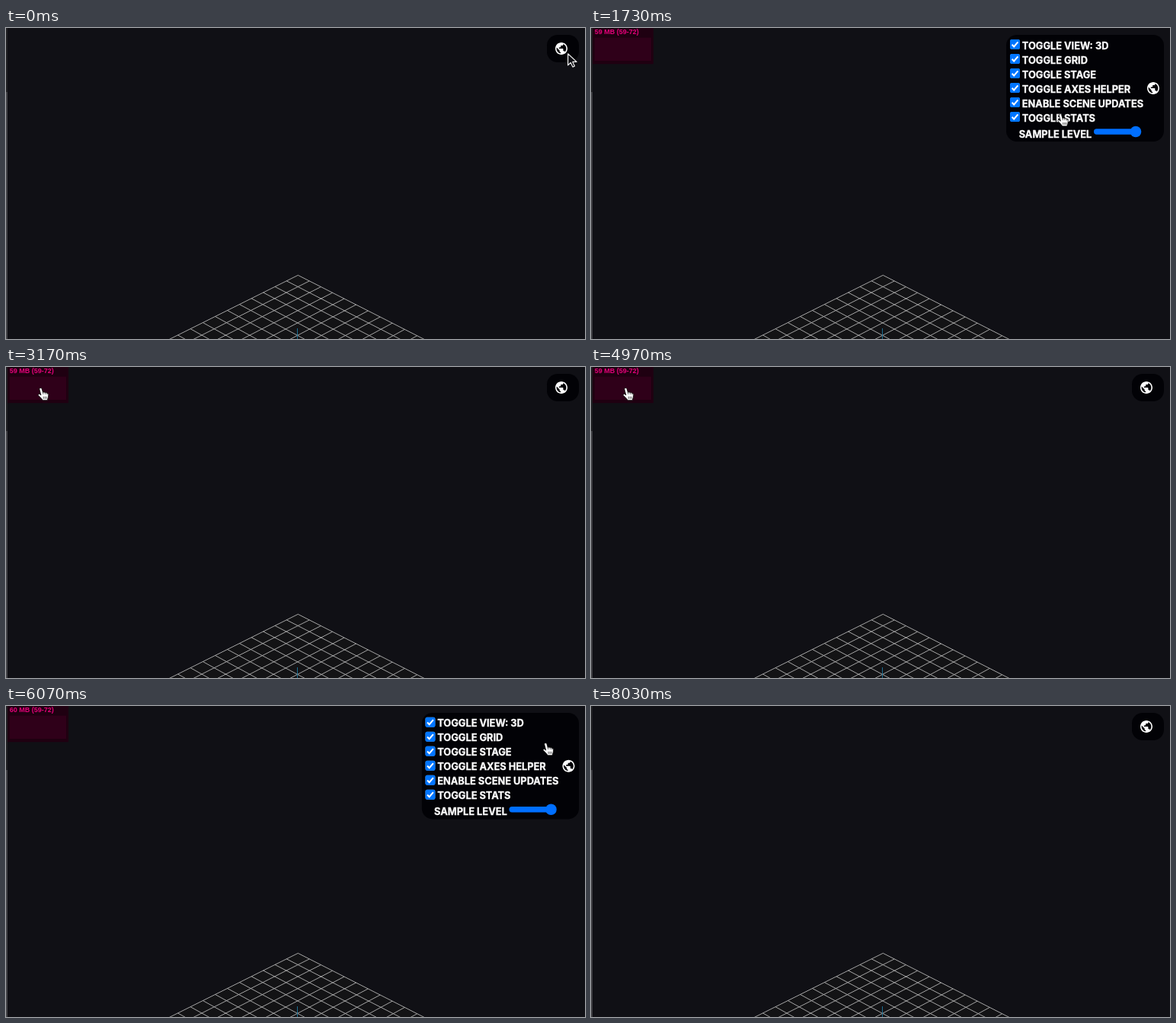
Animation of 760 by 408 pixels, one loop 8160 ms. Source, as an HTML page:

```html
<!DOCTYPE html>
<html lang="en">
<head>
<meta charset="utf-8">
<title>Scene settings panel</title>
<style>
html, body { margin: 0; width: 100%; height: 100%; overflow: hidden; background: #101015; }
svg { display: block; width: 760px; height: 408px; }
.label { font: 700 12.8px Inter, sans-serif; fill: #fff; stroke: #fff; stroke-width: .3; }
.memory { font: 700 9px "Liberation Sans", Arial, sans-serif; fill: #e6007a; }
</style>
</head>
<body>
<svg viewBox="0 0 760 408">
  <defs>
    <clipPath id="clip"><rect class="box" rx="14"/></clipPath>
    <path id="globe" fill="#fff" transform="scale(.8) translate(-12 -12)" d="M12 2C6.48 2 2 6.48 2 12s4.48 10 10 10 10-4.48 10-10S17.52 2 12 2zm-1 17.93c-3.95-.49-7-3.85-7-7.93 0-.62.08-1.21.21-1.79L9 15v1c0 1.1.9 2 2 2v1.93zm6.9-2.54c-.26-.81-1-1.39-1.9-1.39h-1v-3c0-.55-.45-1-1-1H8v-2h2c.55 0 1-.45 1-1V7h2c1.1 0 2-.9 2-2v-.41c2.93 1.19 5 4.06 5 7.41 0 2.08-.8 3.97-2.1 5.39z"/>
  </defs>
  <rect width="760" height="408" fill="#101015"/>
  <rect width="1" height="84" x=".5" fill="#303035"/>
  <rect width="1" height="324" x=".5" y="84" fill="#77777b"/>
  <path d="M383.3 324L215 408H549Z" fill="#131315"/>
  <path id="grid" fill="none" stroke="#b4b4b4" stroke-width=".9"/>
  <path d="M382.5 394V408" stroke="#1c6f92"/>

  <g id="stats">
    <rect x="2" y="-1" width="80" height="48.3" fill="#1f0011"/>
    <rect x="4.7" y="12.7" width="74.3" height="30.3" fill="#2f0019"/>
    <text id="memory" class="memory" x="4.7" y="8.4"></text>
  </g>

  <rect class="box" rx="14" fill="#020206"/>
  <g clip-path="url(#clip)">
    <g id="content">
      <g id="rows"></g>
      <text class="label" x="561.7" y="143.6">SAMPLE LEVEL</text>
      <rect x="660" y="132.3" width="60" height="7.4" rx="3.7" fill="#006fff"/>
      <circle cx="715" cy="136" r="7.3" fill="#006fff"/>
      <use href="#globe" x="738" y="79"/>
    </g>
    <g id="closedIcon"><use href="#globe"/></g>
  </g>

  <g id="cursor">
    <path id="arrow" fill="#101015" stroke="#f0f0f0" stroke-width="1.2" stroke-linejoin="round" d="M.6 .8v15l3.6-3.3 2.7 5.6 2.5-1.2-2.6-5.5h5.2z"/>
    <g id="hand" transform="scale(1.06)">
      <path fill="#fff" stroke="#000" stroke-width=".7" stroke-linejoin="round" d="M1.7 1.8C1.7 0 4.2-.1 4.8 1.6L6.1 6.2C7 5.2 8.3 5.5 8.7 6.4 9.6 5.7 10.8 6.2 11.1 7.1 12.4 6.7 13.2 7.8 13 9.2L12.6 12.2 11.5 15.7H6L3.4 12.4.4 9.6C-.2 8.4 1 7.4 2.2 8.2L3.7 9.4Z"/>
      <path fill="none" stroke="#000" stroke-width=".6" d="M6.1 6.2l.5 2.2M8.7 6.4l.4 2M11.1 7.1l.3 1.8M6.8 11v3M8.7 11v3M10.5 11v3"/>
    </g>
  </g>
</svg>
<script>
const LOOP = 8160;
const PANEL_MS = 300;
const panelOpen = [[30, 1870], [5800, 7290]];
const statsOn = [1330, 6970];
const memorySteps = [[0, 59], [1970, 60], [2970, 59], [3970, 60], [4970, 59], [5870, 60], [6900, 59]];
// time, x, y, shape shown from this time on
const cursorPath = [
  [0, 737, 33, 'arrow'], [30, 737, 33, 'arrow'], [300, 708, 52, 'hand'], [630, 647, 86, 'hand'],
  [830, 640, 92, 'hand'], [870, 640, 92, 'hand'], [1030, 613, 112, 'hand'], [1730, 613, 112, 'hand'],
  [1870, 543, 136, 'arrow'], [1970, 460, 142, 'arrow'], [2150, 275, 98, 'arrow'], [2330, 120, 45, 'arrow'],
  [2430, 70, 33, 'hand'], [2530, 44, 30, 'hand'], [2800, 42, 27, 'hand'], [4970, 42, 27, 'hand'],
  [5330, 52, 29, 'hand'], [5500, 52, 29, 'hand'], [5560, 100, 29, 'arrow'], [5680, 410, 30, 'arrow'],
  [5800, 708, 31, 'arrow'], [5900, 718, 32, 'arrow'], [6050, 708, 46, 'hand'], [6300, 670, 71, 'hand'],
  [6430, 573, 113, 'hand'], [6570, 573, 113, 'hand'], [6670, 573, 116, 'hand'], [7230, 573, 116, 'hand'],
  [7290, 660, 60, 'none'], [LOOP, 660, 60, 'none']
];

const byId = id => document.getElementById(id);
const boxes = document.querySelectorAll('.box');
const mix = (a, b, k) => a + (b - a) * k;
const show = (node, on) => node.setAttribute('display', on ? 'inline' : 'none');
const move = (node, x, y) => node.setAttribute('transform', `translate(${x} ${y})`);

// cubic-bezier(.25, .1, .25, 1)
function ease(x) {
  if (x <= 0) return 0;
  if (x >= 1) return 1;
  const curve = (a, b, s) => 3 * a * s * (1 - s) ** 2 + 3 * b * s * s * (1 - s) + s ** 3;
  let low = 0, high = 1;
  for (let n = 0; n < 20; n++) {
    const mid = (low + high) / 2;
    if (curve(.25, .25, mid) < x) low = mid; else high = mid;
  }
  return curve(.1, 1, low);
}

function buildGrid() {
  const point = (i, j) => {
    const depth = 1 - .0049 * (i + j);
    return `${383.3 + (14.87 * j - 15 * i) / depth} ${324.3 + (7.47 * i + 7.55 * j) / depth}`;
  };
  let d = '';
  for (let n = 0; n < 13; n++) {
    d += `M${point(n, 0)}L${point(n, 13)}M${point(0, n)}L${point(13, n)}`;
  }
  byId('grid').setAttribute('d', d);
}

function buildRows() {
  const labels = ['TOGGLE VIEW: 3D', 'TOGGLE GRID', 'TOGGLE STAGE', 'TOGGLE AXES HELPER',
    'ENABLE SCENE UPDATES', 'TOGGLE STATS'];
  byId('rows').innerHTML = labels.map((label, n) => {
    const y = 15 + 19 * n;
    return `<g><rect x="550.5" y="${y + .5}" width="12" height="12" rx="2" fill="#fff" stroke="#767676"/>
      <g class="tick"><rect x="550" y="${y}" width="13" height="13" rx="2" fill="#0075ff"/>
      <path d="M552.6 ${y + 6.8}l2.6 2.7 5.2-6.2" fill="none" stroke="#fff" stroke-width="2"/></g>
      <text class="label" x="565.8" y="${y + 12.6}">${label}</text></g>`;
  }).join('');
}

function drawPanel(t) {
  const [start, end] = panelOpen[t < panelOpen[1][0] ? 0 : 1];
  const expanded = t >= start && t < end;
  const k = t < end ? ease((t - start) / PANEL_MS) : 1 - ease((t - end) / PANEL_MS);
  const width = mix(42, 207, k), height = mix(36, 140, k);
  const x = 752 - width, y = 9;
  for (const box of boxes) {
    for (const [key, value] of Object.entries({ x, y, width, height })) box.setAttribute(key, value);
  }
  const cx = x + width / 2, cy = y + height / 2;
  show(byId('content'), expanded);
  show(byId('closedIcon'), !expanded);
  move(byId('content'), cx - 648.5, cy - 79);
  move(byId('closedIcon'), cx - 2, cy);
}

function drawStats(t) {
  const on = t >= statsOn[0] && t < statsOn[1];
  show(byId('stats'), on);
  show(statsTick, on);
  const value = memorySteps.findLast(step => step[0] <= t)[1];
  byId('memory').textContent = `${value} MB (59-72)`;
}

function drawCursor(t) {
  const n = cursorPath.findLastIndex(key => key[0] <= t);
  const [t0, x0, y0, shape] = cursorPath[n];
  const [t1, x1, y1] = cursorPath[n + 1];
  const k = (t - t0) / (t1 - t0);
  move(byId('cursor'), mix(x0, x1, k), mix(y0, y1, k));
  show(byId('arrow'), shape === 'arrow');
  show(byId('hand'), shape === 'hand');
}

buildGrid();
buildRows();
const statsTick = [...document.querySelectorAll('.tick')].pop();
const began = performance.now();

function draw() {
  const t = Math.max(0, performance.now() - began) % LOOP;
  drawPanel(t);
  drawStats(t);
  drawCursor(t);
  requestAnimationFrame(draw);
}
draw();
</script>
</body>
</html>
```
